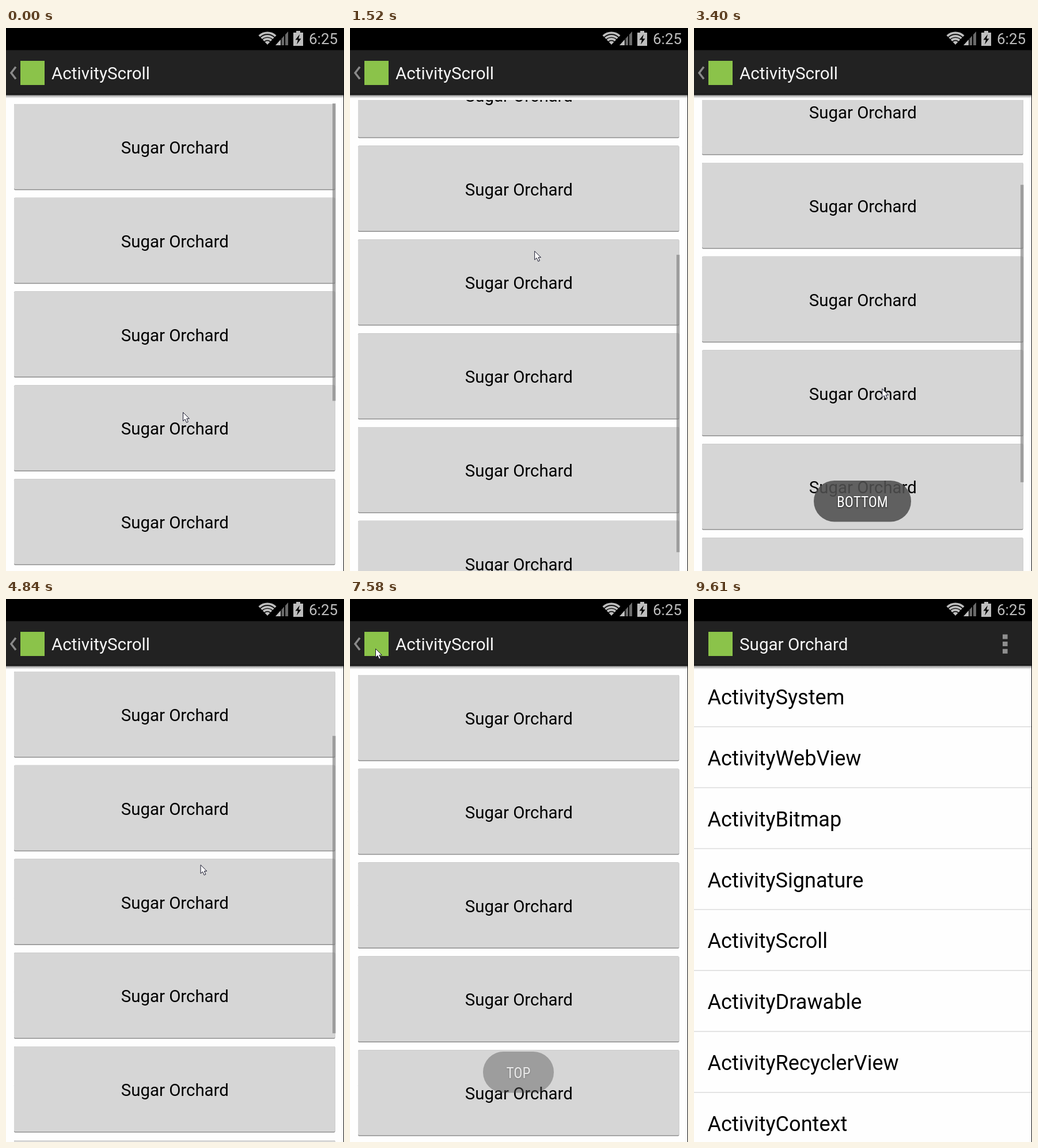
An HTML page that plays this animation: 587x943 px, repeating every 9.89 s.

```html
<!DOCTYPE html>
<html lang="en">
<head>
<meta charset="utf-8">
<title>ActivityScroll</title>
<style>
  html, body { margin: 0; width: 100%; height: 100%; overflow: hidden; background: #fefefe; }
  svg { display: block; width: 100vw; height: 100vh; font-family: Roboto, "Noto Sans", sans-serif; }
  .title { font-size: 29.6px; fill: #f6f6f6; }
  .label { font-size: 29.4px; text-anchor: middle; }
  .item { font-size: 36.1px; }
  .toast { font: 25.2px "Roboto Condensed", Roboto, sans-serif; font-stretch: 75%; fill: #fff;
    text-anchor: middle; text-shadow: 0 1px 3px rgba(0, 0, 0, .7); }
</style>
</head>
<body>
<svg viewBox="0 0 587 943" preserveAspectRatio="none">
  <defs>
    <clipPath id="view"><rect y="125" width="587" height="828"/></clipPath>
    <linearGradient id="shade" x2="0" y2="1">
      <stop stop-color="#000" stop-opacity=".45"/>
      <stop offset="1" stop-color="#000" stop-opacity="0"/>
    </linearGradient>
    <g id="bar">
      <rect y="38" width="587" height="78" fill="#222"/>
      <rect y="114" width="587" height="2" fill="#191919"/>
      <rect y="116" width="587" height="6" fill="url(#shade)"/>
      <rect x="25" y="57" width="42" height="42" fill="#8bc34a"/>
    </g>
  </defs>

  <rect width="587" height="943" fill="#fefefe"/>
  <g id="items"></g>
  <rect id="listThumb" x="575" y="291" width="6" height="652" fill="#808080" fill-opacity=".62"/>
  <use href="#bar"/>
  <text class="title" x="79" y="89">Sugar Orchard</text>
  <path d="M536 61.5h8.6v8h-8.6zm0 12.6h8.6v8h-8.6zm0 12.6h8.6v8h-8.6z" fill="#8f8f8f"/>

  <g id="page">
    <rect y="117" width="587" height="836" fill="#fefefe"/>
    <g clip-path="url(#view)"><g id="buttons"></g></g>
    <rect id="thumb" x="567" y="131" width="5.5" height="516.5" fill="#808080" fill-opacity=".66"/>
    <use href="#bar"/>
    <path d="M17 67.5L9 78l8 10.5" fill="none" stroke="#8a8a8a" stroke-width="3.6"/>
    <text class="title" x="79" y="89">ActivityScroll</text>
  </g>

  <rect x="586" y="38" width="1" height="905" fill="#111"/>
  <rect width="587" height="38.5"/>
  <g id="status" fill="#bebebe">
    <path d="M468 30L477 20V30z"/>
    <path d="M478.5 30V18.5L483 13.5V30zM485 30V11.5L490 6V30z" fill="#6a6a6a"/>
    <path d="M504 5h7v3h5v23h-17v-23h5z"/>
    <path d="M510 11l-7.5 9.5h4.5l-2 8 7.5-10h-4.5z" fill="#000"/>
    <text x="526" y="28" font-size="26">6:25</text>
  </g>

  <g id="toasts"></g>
  <path id="cursor" d="M.5 .5V15.5L4 12.3 6.6 18.2 9.3 17 6.8 11.3H11.3z" fill="#fff" stroke="#15152a"/>
</svg>

<script>
const LOOP = 9890, STEP = LOOP / 72;
const $ = id => document.getElementById(id);
const add = (id, markup) => $(id).insertAdjacentHTML('beforeend', markup);

const ramp = (t, from, to) => Math.min(1, Math.max(0, (t - from) / (to - from)));
const ease = p => p * p * (3 - 2 * p);
// Fades in at one time and out at another.
const pulse = (t, on, off) => ramp(t, on, on + 150) * (1 - ramp(t, off, off + 300));
// Applies each eased move in turn, starting from where the last one ended.
const follow = (t, start, moves) => moves.reduce((pos, { from, to, at }) => {
  const p = ease(ramp(t, from, to));
  return pos.map((v, i) => v + (at[i] - v) * p);
}, start);

const pointerMoves = [
  { from: 240, to: 1100, at: [315, 385] },
  { from: 1250, to: 2100, at: [338, 394] },
  { from: 2800, to: 3500, at: [326, 632] },
  { from: 3700, to: 4400, at: [335, 380] },
  { from: 4600, to: 5150, at: [343, 634] },
  { from: 6150, to: 6450, at: [404, 667] },
  { from: 6500, to: 7030, at: [44, 86] },
  { from: 8250, to: 8790, at: [258, 444] },
  { from: 8950, to: 9600, at: [420, 960] }
];
const flings = [
  { from: 618, to: 1760, at: [473.6] },
  { from: 2800, to: 3460, at: [222.5] },
  { from: 4600, to: 5250, at: [0] }
];

function build() {
  for (let i = 0; i < 8; i++) {
    add('buttons', `<g transform="translate(0 ${132 + i * 162.8})">
      <rect x="14" width="557.5" height="149.5" rx="2" fill="#8e8e8e"/>
      <rect x="14" width="557.5" height="148" rx="2" fill="#d6d6d6"/>
      <text class="label" x="293.3" y="86">Sugar Orchard</text></g>`);
  }
  'System WebView Bitmap Signature Scroll Drawable RecyclerView Context'.split(' ')
    .forEach((name, i) => {
      const y = 183 + i * 105.86;
      add('items', `<text class="item" x="23.5" y="${y}">Activity${name}</text>
        <rect y="${y + 38}" width="587" height="1.5" fill="#dcdcdc"/>`);
    });
  const toast = (id, w) => add('toasts', `<g id="${id}">
    <rect x="${292.5 - w / 2}" y="786" width="${w}" height="71.5" rx="35.7" fill="#505050" fill-opacity=".88"/>
    <text class="toast" x="292.5" y="832">${id.toUpperCase()}</text></g>`);
  toast('bottom', 169);
  toast('top', 123);
  const arc = r => {
    const x = r * Math.sin(.76), y = 29 - r * Math.cos(.76);
    return `M${454 - x} ${y}A${r} ${r} 0 0 1 ${454 + x} ${y}`;
  };
  add('status', `<path d="${arc(6.5)}L454 29z"/>
    <path d="${arc(10)}${arc(15.2)}${arc(20.6)}" fill="none" stroke="#bebebe" stroke-width="3.8"/>`);
}

function draw(time) {
  const t = Math.floor(time / STEP + .3) * STEP;
  const [x, y] = follow(t, [307, 667], pointerMoves);
  const [scroll] = follow(t, [0], flings);
  const gone = ramp(t, 7690, 8035);
  const size = 1 - .2 * gone;
  const move = (id, value) => $(id).setAttribute('transform', value);
  const fade = (id, alpha) => $(id).setAttribute('opacity', alpha);

  move('cursor', `translate(${x} ${y})`);
  move('buttons', `translate(0 ${-scroll})`);
  move('thumb', `translate(0 ${scroll * .632})`);
  move('page', `translate(${293.5 * (1 - size)} ${481 * (1 - size)}) scale(${size})`);
  fade('page', 1 - gone);
  fade('thumb', pulse(t, -300, 1900) + pulse(t, 2720, 3650) + pulse(t, 4550, 5590));
  fade('bottom', pulse(t, 1880, 3950));
  fade('top', pulse(t, 5200, 7400));
  fade('listThumb', 1 - ramp(t, 9070, 9340));
}

build();
const start = performance.now();
function tick() {
  draw((performance.now() - start) % LOOP);
  requestAnimationFrame(tick);
}
tick();
</script>
</body>
</html>
```
